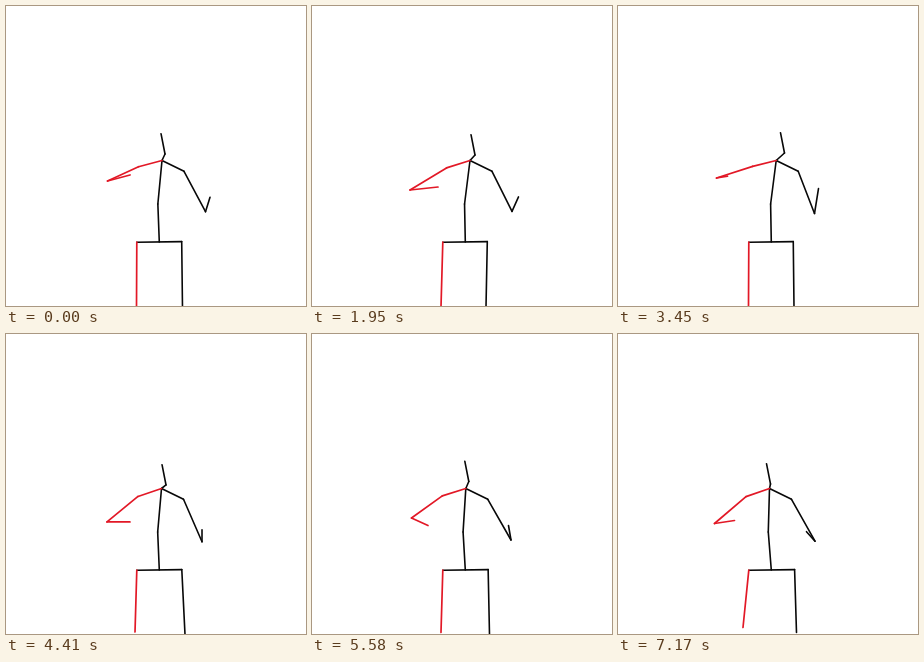
Animation of 300 by 300 pixels, one loop 7200 ms. Source, as an HTML page without scripts:

```html
<!DOCTYPE html>
<html lang="en">
<head>
<meta charset="utf-8">
<title>Stick figure</title>
<style>
  @property --lean   { syntax: "<number>"; inherits: true; initial-value: 0; }
  @property --nod    { syntax: "<number>"; inherits: true; initial-value: 3; }
  @property --chin-y { syntax: "<number>"; inherits: true; initial-value: 148; }
  @property --lw-x   { syntax: "<number>"; inherits: true; initial-value: 100; }
  @property --lw-y   { syntax: "<number>"; inherits: true; initial-value: 180; }
  @property --lh-x   { syntax: "<number>"; inherits: true; initial-value: 20; }
  @property --lh-y   { syntax: "<number>"; inherits: true; initial-value: 0; }
  @property --rw-x   { syntax: "<number>"; inherits: true; initial-value: 199; }
  @property --rh-x   { syntax: "<number>"; inherits: true; initial-value: 4; }
  @property --rh-y   { syntax: "<number>"; inherits: true; initial-value: -14; }
  @property --lk-x   { syntax: "<number>"; inherits: true; initial-value: 130; }
  @property --lk-y   { syntax: "<number>"; inherits: true; initial-value: 302; }
  @property --rk-x   { syntax: "<number>"; inherits: true; initial-value: 176; }

  html, body { margin: 0; width: 100%; height: 100%; overflow: hidden; background: #fff; }
  svg { display: block; width: 100vw; height: 100vh; animation: talk 7.2s linear infinite; }

  /* Key poses: l/r = side, w = wrist, h = hand tip from wrist, k = knee */
  @keyframes talk {
    0% {
      --lean: 3; --nod: 3; --chin-y: 148; --lk-x: 130.5; --lk-y: 302; --rk-x: 176.5;
      --lw-x: 101.5; --lw-y: 175; --lh-x: 22.5; --lh-y: -6; --rw-x: 199.5; --rh-x: 4.5; --rh-y: -14.5;
    }
    12.5% {
      --lean: 9.5; --nod: 4.5; --chin-y: 150.5; --lk-x: 127; --lk-y: 302; --rk-x: 173;
      --lw-x: 101.5; --lw-y: 173; --lh-x: 38.5; --lh-y: -16; --rw-x: 202; --rh-x: 13; --rh-y: -12;
    }
    20.8% { --lw-x: 95; --rh-x: 12; }
    27.1% {
      --lean: 5; --nod: 5; --chin-y: 149; --lk-x: 129; --lk-y: 301; --rk-x: 174;
      --lw-x: 98; --lw-y: 184; --lh-x: 28; --lh-y: -3; --rw-x: 200; --rh-x: 6.5; --rh-y: -14.5;
    }
    47.9% {
      --lean: 5.2; --nod: 8.3; --chin-y: 147; --lk-x: 130.5; --lk-y: 301; --rk-x: 176;
      --lw-x: 98.5; --lw-y: 172; --lh-x: 11; --lh-y: -2; --rw-x: 196.5; --rh-x: 4; --rh-y: -25;
    }
    61.3% {
      --lean: 2.5; --nod: 4.5; --chin-y: 151; --lk-x: 129; --lk-y: 298; --rk-x: 179;
      --lw-x: 101; --lw-y: 188; --lh-x: 23; --lh-y: 0; --rw-x: 196; --rh-x: 0; --rh-y: -12;
    }
    68.8% { --lw-x: 95.5; --rw-x: 201; }
    77.5% {
      --lean: .8; --nod: 3; --chin-y: 147.5; --lk-x: 129; --lk-y: 298.5; --rk-x: 177.5;
      --lw-x: 99.5; --lw-y: 184; --lh-x: 16.5; --lh-y: 7.5; --rw-x: 199; --rh-x: -2.5; --rh-y: -14.5;
    }
    88.9% { --lw-x: 99.5; --chin-y: 152; }
    99.6%, 100% {
      --lean: -1.5; --nod: 1; --chin-y: 150; --lk-x: 125; --lk-y: 293.5; --rk-x: 178.5;
      --lw-x: 96.5; --lw-y: 189.5; --lh-x: 20; --lh-y: -3; --rw-x: 197; --rh-x: -8.5; --rh-y: -9.5;
    }
  }

  /* Joints that follow from the pose */
  g {
    --neck-x: calc(153 + var(--lean));
    --neck-y: 154.5;
    --chin-x: calc(var(--neck-x) + var(--nod));
    --mid-x: calc(150.8 + .35 * var(--lean));
    --hip-x: calc(176.3 - .2 * var(--lean));
    --le-x: calc(var(--neck-x) - 23.5);
    --le-y: calc(138 + .13 * var(--lw-y));
    --re-x: calc(var(--neck-x) + 22);
    --re-y: 165.3;
    --rw-y: calc(206 - .6 * (var(--rw-x) - 199));
  }

  /* A unit line laid from (x1, y1) along (dx, dy) */
  line {
    --dx: calc(var(--x2) - var(--x1));
    --dy: calc(var(--y2) - var(--y1));
    transform: matrix(var(--dx), var(--dy), calc(-1 * var(--dy)), var(--dx), var(--x1), var(--y1));
    vector-effect: non-scaling-stroke;
    stroke: #080808;
    stroke-width: 1.6;
    stroke-linecap: round;
  }
  .left { stroke: #e21826; stroke-width: 1.7; }

  .hips  { --x1: 130.8; --y1: 236.2; --x2: var(--hip-x); --y2: 235.6; }
  .thigh { --x1: var(--hip-x); --y1: 235.6; --x2: var(--rk-x); --y2: calc(181 + .4 * var(--lk-y)); }
  .waist { --x1: 153.3; --y1: 236; --x2: var(--mid-x); --y2: 198; }
  .chest { --x1: var(--mid-x); --y1: 198; --x2: var(--neck-x); --y2: var(--neck-y); }
  .neck  { --x1: var(--neck-x); --y1: var(--neck-y); --x2: var(--chin-x); --y2: var(--chin-y); }
  .head  { --x1: var(--chin-x); --y1: var(--chin-y); --x2: calc(var(--chin-x) - 4); --y2: calc(var(--chin-y) - 20.3); }
  .upper { --x1: var(--neck-x); --y1: var(--neck-y); --x2: var(--re-x); --y2: var(--re-y); }
  .fore  { --x1: var(--re-x); --y1: var(--re-y); --x2: var(--rw-x); --y2: var(--rw-y); }
  .hand  { --x1: var(--rw-x); --y1: var(--rw-y); --x2: calc(var(--rw-x) + var(--rh-x)); --y2: calc(var(--rw-y) + var(--rh-y)); }

  .left.thigh { --x1: 130.8; --y1: 236.2; --x2: var(--lk-x); --y2: var(--lk-y); }
  .left.upper { --x2: var(--le-x); --y2: var(--le-y); }
  .left.fore  { --x1: var(--le-x); --y1: var(--le-y); --x2: var(--lw-x); --y2: var(--lw-y); }
  .left.hand  { --x1: var(--lw-x); --y1: var(--lw-y); --x2: calc(var(--lw-x) + var(--lh-x)); --y2: calc(var(--lw-y) + var(--lh-y)); }
</style>
</head>
<body>
<svg viewBox="0 0 300 300">
  <g>
    <line class="hips" x2="1"/>
    <line class="thigh" x2="1"/>
    <line class="left thigh" x2="1"/>
    <line class="waist" x2="1"/>
    <line class="chest" x2="1"/>
    <line class="neck" x2="1"/>
    <line class="head" x2="1"/>
    <line class="upper" x2="1"/>
    <line class="fore" x2="1"/>
    <line class="hand" x2="1"/>
    <line class="left upper" x2="1"/>
    <line class="left fore" x2="1"/>
    <line class="left hand" x2="1"/>
  </g>
</svg>
</body>
</html>
```
